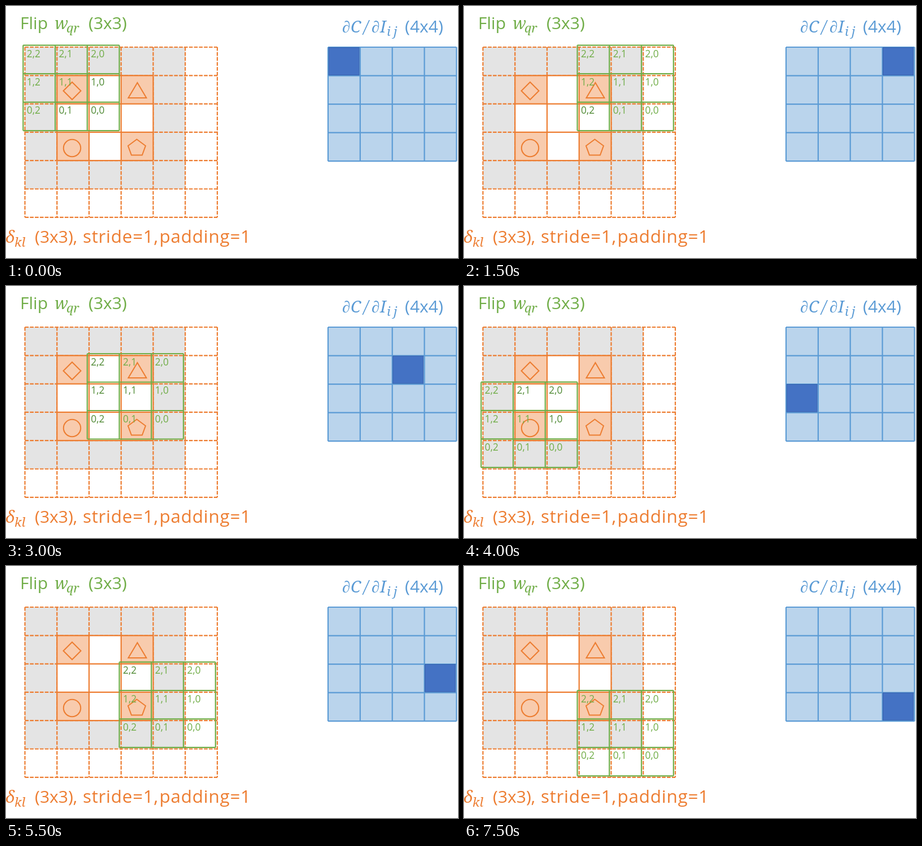
Write an HTML page that moves like this. It is 800 px wide and 447 px high and loops after 8 s.

```html
<!DOCTYPE html>
<html lang="en">
<head>
<meta charset="utf-8">
<style>
  html, body { margin: 0; width: 100%; height: 100%; overflow: hidden; background: #fff; }
  svg { display: block; width: 100vw; height: 100vh; }
  text { font: 400 30px "Open Sans", "Noto Sans", sans-serif; }
  .wide { font-size: 31.5px; letter-spacing: .7px; }
  .math { font: italic 300 29px "Noto Serif", "Liberation Serif", serif; }
  .sub { font-size: 22px; }
  #kernel text { font-size: 17.3px; }
  .line { fill: none; stroke-width: 2.2; }
  .icon { fill: none; stroke: #ed7d31; stroke-width: 2; }
</style>
</head>
<body>
<svg viewBox="0 0 800 447">
  <g fill="#70ad47">
    <text x="25" y="41">Flip</text>
    <text class="math" x="86" y="41">w</text>
    <text class="math sub" x="107" y="47">qr</text>
    <text x="146" y="41">(3x3)</text>
  </g>
  <g fill="#5b9bd5">
    <text class="math" x="595" y="47">∂</text>
    <text class="math" x="610" y="47">C</text>
    <text class="math" x="633" y="47">/</text>
    <text class="math" x="647" y="47">∂</text>
    <text class="math" x="662" y="47">I</text>
    <text class="math sub" x="674" y="53">i</text>
    <text class="math sub" x="686" y="53">j</text>
    <text x="706" y="47">(4x4)</text>
  </g>
  <g fill="#ed7d31">
    <text class="math" x="-1" y="420">δ</text>
    <text class="math sub" x="15" y="427">kl</text>
    <text x="51" y="420">(3x3),</text>
    <text class="wide" x="136" y="420">stride=1,</text>
    <text class="wide" x="271.5" y="420">padding=1</text>
  </g>
  <g id="input"></g>
  <g class="icon">
    <path d="M117 135l15.5 15.5-15.5 15.5-15.5-15.5z"/>
    <path d="M232.5 136l16 27h-32z"/>
    <circle cx="117" cy="252" r="15.2"/>
    <path d="M231.5 236.5L247 248 241 264.5H222L216 248z"/>
  </g>
  <g id="output"></g>
  <rect id="cell" width="53.8" height="48.6" fill="#4472c4" stroke="#3560ac"/>
  <g id="kernel"></g>
</svg>
<script>
const W = 56.75, H = 50.3, X = 33.5, Y = 73;
const $ = id => document.getElementById(id);

const box = (x, y, w, h, fill) =>
  `<rect x="${x}" y="${y}" width="${w}" height="${h}" fill="${fill}"/>`;

// n by n cells drawn as full-length rules
function grid(x, y, n, w, h, color, dash = "none") {
  let d = "";
  for (let i = 0; i <= n; i++) {
    d += `M${x} ${y + i * h}h${n * w}M${x + i * w} ${y}v${n * h}`;
  }
  return `<path class="line" d="${d}" stroke="${color}" stroke-dasharray="${dash}"/>`;
}

const block = (c, r, n, fill) => box(X + c * W, Y + r * H, n * W, n * H, fill);

$("input").innerHTML =
  block(0, 0, 5, "#e4e4e4") +
  grid(X, Y, 6, W, H, "#ed7d31", "6.6 2.2") +
  block(1, 1, 3, "#fff") +
  [1, 3].map(r => [1, 3].map(c => block(c, r, 1, "#f8cbad")).join("")).join("") +
  grid(X + W, Y + H, 3, W, H, "#ed7d31");

$("output").innerHTML =
  box(570, 73, 227.4, 202.2, "#bad4ec") + grid(570, 73, 4, 56.85, 50.55, "#5b9bd5");

let labels = "";
for (let i = 0; i < 9; i++) {
  const c = i % 3, r = Math.floor(i / 3);
  labels += `<text x="${6.5 + c * W}" y="${21 + r * H}">${2 - r},${2 - c}</text>`;
}
$("kernel").innerHTML = grid(0, 0, 3, W, 50.5, "#70ad47") + labels;
const texts = $("kernel").querySelectorAll("text");

// labels are darker over the white cells of the inner block
const inner = i => i >= 1 && i <= 3;
const onWhite = (c, r) => inner(c) && inner(r) && (c === 2 || r === 2);

function draw(time) {
  const step = Math.floor(time % 8000 / 500);
  const col = step % 4, row = Math.floor(step / 4);
  $("kernel").setAttribute("transform", `translate(${30.3 + col * W} ${69.6 + row * 50.4})`);
  $("cell").setAttribute("x", 571.3 + col * 56.75);
  $("cell").setAttribute("y", 73.8 + row * 50.4);
  texts.forEach((t, i) => {
    const white = onWhite(col + i % 3, row + Math.floor(i / 3));
    t.setAttribute("fill", white ? "#4f8a34" : "#70ad47");
  });
}

const start = performance.now();
function frame() {
  draw(performance.now() - start);
  requestAnimationFrame(frame);
}
frame();
</script>
</body>
</html>
```
